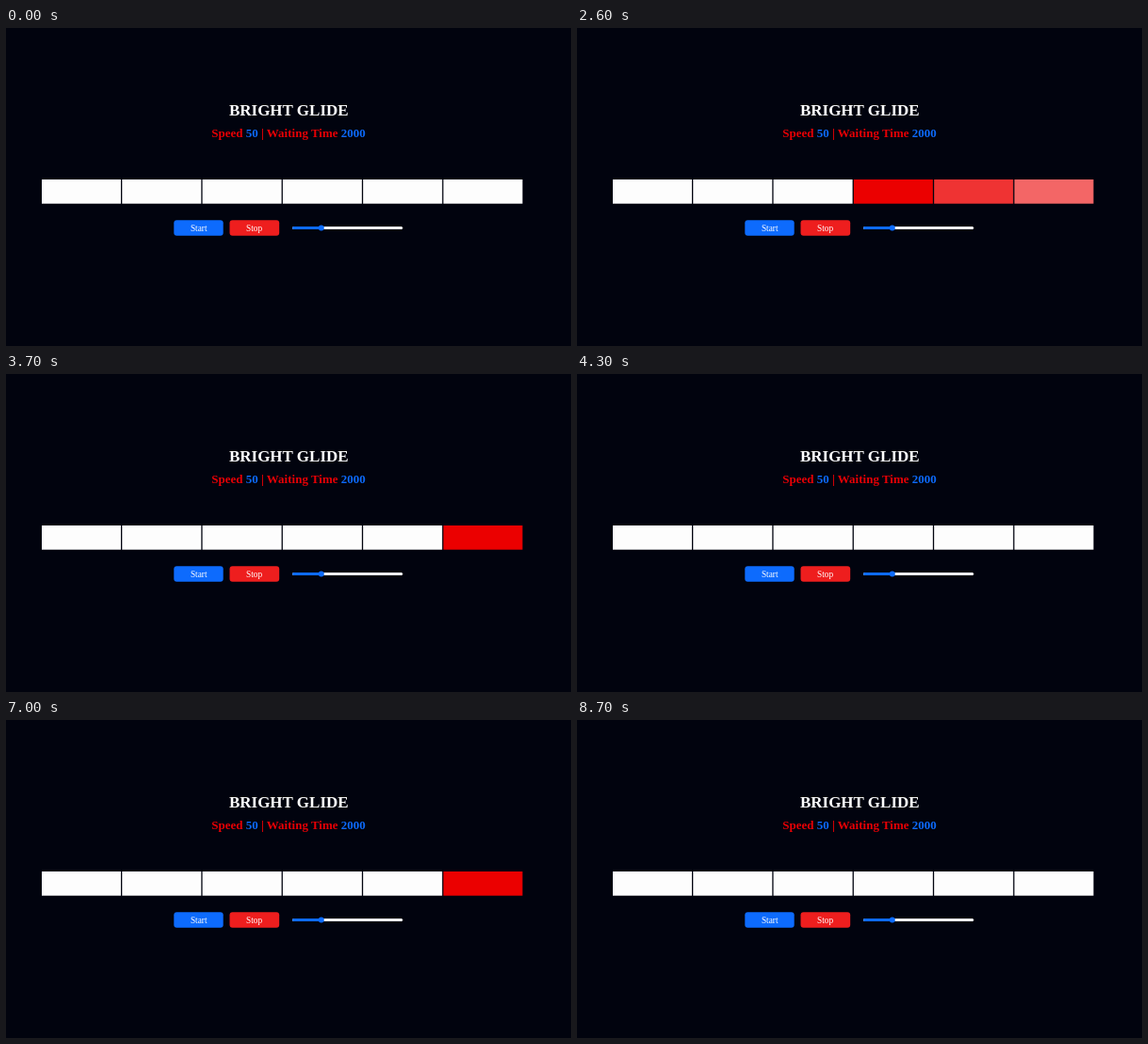
An HTML page that plays this animation: 600x338 px, repeating every 8.8 s.

```html
<!DOCTYPE html>
<html lang="en">
<head>
<meta charset="utf-8">
<title>Bright Glide</title>
<style>
  html, body { margin: 0; width: 100%; height: 100%; overflow: hidden; background: #01030e; }
  svg { display: block; width: 600px; height: 338px; }
  text { font-family: "Liberation Serif", "Times New Roman", serif; text-anchor: middle; fill: #fff; }
  .title { font-size: 17px; font-weight: bold; }
  .info { font-size: 13px; font-weight: bold; fill: #e60005; }
  .label { font-size: 9.3px; }
  .blue { fill: #0d6bfd; }
</style>
</head>
<body>
<svg viewBox="0 0 600 338">
  <text class="title" x="300.3" y="93">BRIGHT GLIDE</text>
  <text class="info" x="300" y="116">Speed <tspan class="blue">50</tspan> | Waiting Time <tspan class="blue">2000</tspan></text>
  <g id="cells"></g>
  <rect class="blue" x="178.3" y="204.3" width="52.4" height="16.5" rx="3"/>
  <text class="label" x="204.7" y="215.6">Start</text>
  <rect x="237.5" y="204.3" width="52.7" height="16.5" rx="3" fill="#ee1e1e"/>
  <text class="label" x="263.6" y="215.6">Stop</text>
  <rect x="304" y="211" width="117.3" height="3" rx="1.5" fill="#f0f0f0"/>
  <rect class="blue" x="304" y="211" width="31" height="3" rx="1.5"/>
  <circle class="blue" cx="334.8" cy="212.5" r="3"/>
</svg>
<script>
const LOOP = 8800, TICK = 100, COUNT = 6;
// Each run: visible span, moment of the first step and step length in ms
const runs = [
  { from: 2000, to: 4300, start: 1907, step: 49.5 },
  { from: 6400, to: 8700, start: 6349.5, step: 50.2 }
];
const group = document.getElementById("cells");
const cells = Array.from({ length: COUNT }, (_, i) => {
  const cell = document.createElementNS("http://www.w3.org/2000/svg", "rect");
  const attrs = { x: 38 + i * 85.3, y: 161, width: 84, height: 25.7 };
  for (const name in attrs) cell.setAttribute(name, attrs[name]);
  return group.appendChild(cell);
});

// Red head fading to white by a fifth per cell behind it
function shade(lag) {
  if (lag < 0 || lag > 4) return "#fdfdfd";
  const light = lag * 51;
  return `rgb(${235 + lag * 4},${light},${light})`;
}

function draw(time) {
  const t = Math.floor(time % LOOP / TICK) * TICK;
  const run = runs.find(r => t >= r.from && t < r.to);
  const n = run ? Math.floor((t - run.start) / run.step) % (2 * COUNT) : 0;
  const leftward = n < COUNT;
  cells.forEach((cell, i) => {
    const order = leftward ? COUNT - 1 - i : i;
    cell.setAttribute("fill", shade(run ? n % COUNT - order : -1));
  });
}

const begin = performance.now();
function frame() {
  draw(performance.now() - begin);
  requestAnimationFrame(frame);
}
frame();
</script>
</body>
</html>
```
